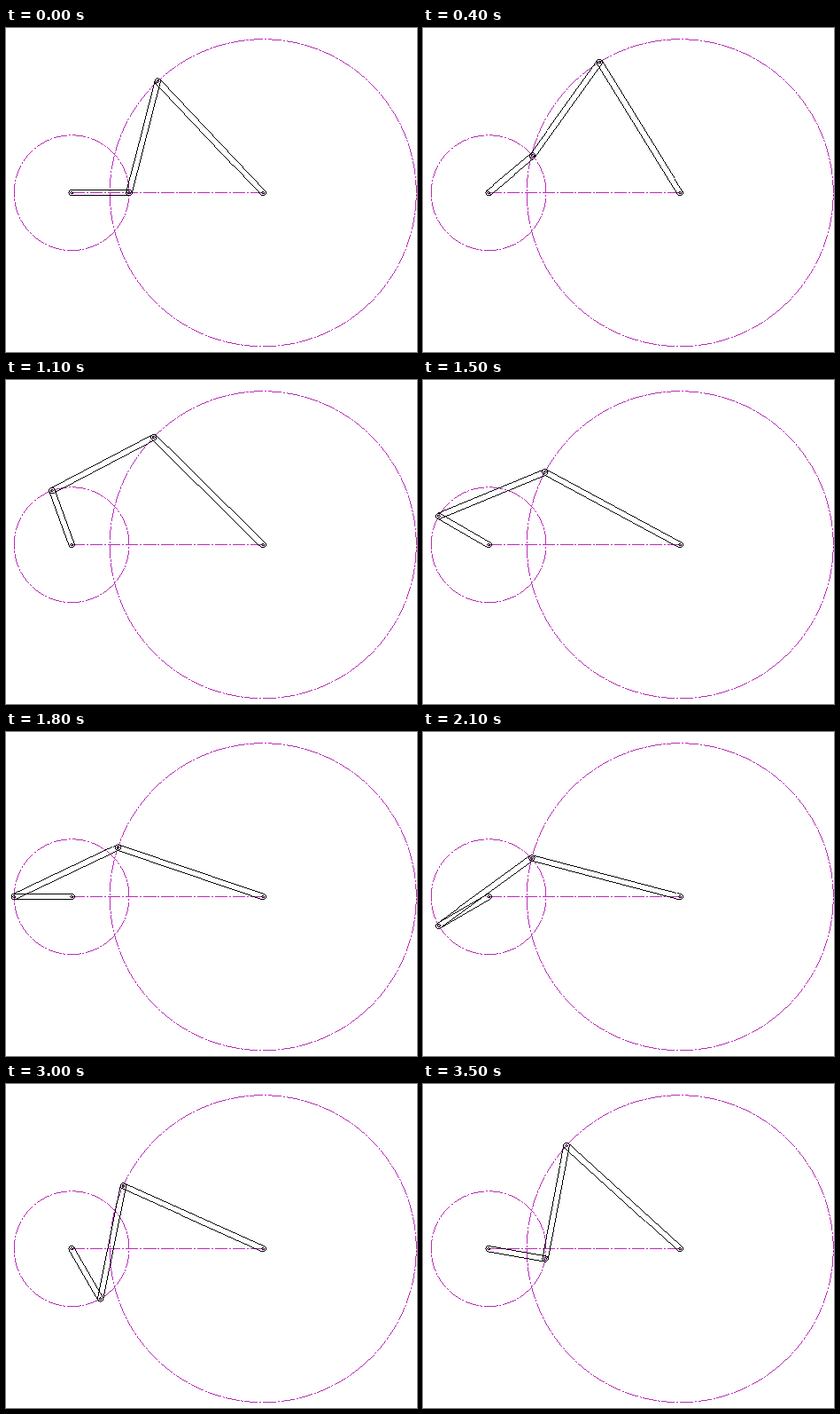
Recreate the animation shown at these times as an HTML page with a canvas. Size 464 by 365 pixels, loop 3600 ms.

```html
<!DOCTYPE html>
<html lang="en">
<head>
<meta charset="utf-8">
<title>Four-bar linkage</title>
<style>
  html, body { margin: 0; width: 100%; height: 100%; overflow: hidden; background: #fff; }
  canvas { display: block; }
</style>
</head>
<body>
<canvas id="stage" width="464" height="365"></canvas>
<script>
const ctx = document.getElementById("stage").getContext("2d");

const STEP_MS = 100, STEPS = 36;
const CRANK = 64.9, COUPLER = 129.7, ROCKER = 173;
const HALF_WIDTH = 3.2, PIN = 1.3;
const O = { x: 73.6, y: 185.2 }, B = { x: 289.7, y: 185.2 };
const DASH = 15, GAP = 2, DOT = 2, PERIOD = DASH + GAP + DOT + GAP;

const plot = (x, y) => ctx.fillRect(Math.round(x), Math.round(y), 1, 1);

const solid = () => true;

// Dash-dot pattern, stretched to a whole number of periods
function dashDot(length, tail) {
  const n = Math.round((length - tail) / PERIOD);
  const scale = (n * PERIOD + tail) / length;
  return s => {
    const p = (s * scale) % PERIOD;
    return p < DASH || (p >= DASH + GAP && p < DASH + GAP + DOT);
  };
}

// One pixel per step of the longer axis, without smoothing
function line(a, b, visible = solid) {
  const dx = b.x - a.x, dy = b.y - a.y;
  const n = Math.max(1, Math.round(Math.max(Math.abs(dx), Math.abs(dy))));
  const len = Math.hypot(dx, dy);
  for (let i = 0; i <= n; i++) {
    const k = i / n;
    if (visible(k * len)) plot(a.x + dx * k, a.y + dy * k);
  }
}

function arc(c, r, from, sweep, visible = solid) {
  const n = Math.ceil(Math.abs(sweep) * r * 2) + 4;
  for (let i = 0; i <= n; i++) {
    const turn = sweep * i / n, t = from + turn;
    if (!visible(Math.abs(turn) * r)) continue;
    const cos = Math.cos(t), sin = Math.sin(t);
    let x = c.x + r * cos, y = c.y + r * sin;
    if (Math.abs(sin) > Math.abs(cos)) {
      x = Math.round(x);
      y = c.y + Math.sign(sin) * Math.sqrt(Math.max(0, r * r - (x - c.x) ** 2));
    } else {
      y = Math.round(y);
      x = c.x + Math.sign(cos) * Math.sqrt(Math.max(0, r * r - (y - c.y) ** 2));
    }
    plot(x, y);
  }
}

function track(c, r) {
  arc(c, r, 0, -2 * Math.PI, dashDot(2 * Math.PI * r, 0));
}

function link(a, b) {
  const angle = Math.atan2(b.y - a.y, b.x - a.x);
  const nx = -Math.sin(angle) * HALF_WIDTH, ny = Math.cos(angle) * HALF_WIDTH;
  for (const side of [-1, 1]) {
    line({ x: a.x + side * nx, y: a.y + side * ny },
         { x: b.x + side * nx, y: b.y + side * ny });
  }
  arc(a, HALF_WIDTH, angle + Math.PI / 2, Math.PI);
  arc(b, HALF_WIDTH, angle - Math.PI / 2, Math.PI);
}

function pose(step) {
  const t = step * 2 * Math.PI / STEPS;
  const A = { x: O.x + CRANK * Math.cos(t), y: O.y - CRANK * Math.sin(t) };
  const dx = B.x - A.x, dy = B.y - A.y, d = Math.hypot(dx, dy);
  const along = (COUPLER ** 2 - ROCKER ** 2 + d * d) / (2 * d);
  const up = Math.sqrt(COUPLER ** 2 - along ** 2);
  const C = {
    x: A.x + (along * dx + up * dy) / d,
    y: A.y + (along * dy - up * dx) / d
  };
  return { A, C };
}

function draw(step) {
  const { A, C } = pose(step);
  ctx.fillStyle = "#fff";
  ctx.fillRect(0, 0, 464, 365);

  ctx.fillStyle = "#b82cb8";
  track(O, CRANK);
  track(B, ROCKER);
  line(O, B, dashDot(B.x - O.x, DASH));

  ctx.fillStyle = "#000";
  link(O, A);
  link(A, C);
  link(C, B);
  for (const p of [O, A, C, B]) arc(p, PIN, 0, 2 * Math.PI);
}

let shown = -1;
function tick() {
  const step = Math.floor(performance.now() / STEP_MS) % STEPS;
  if (step !== shown) draw(shown = step);
  requestAnimationFrame(tick);
}
tick();
</script>
</body>
</html>
```
